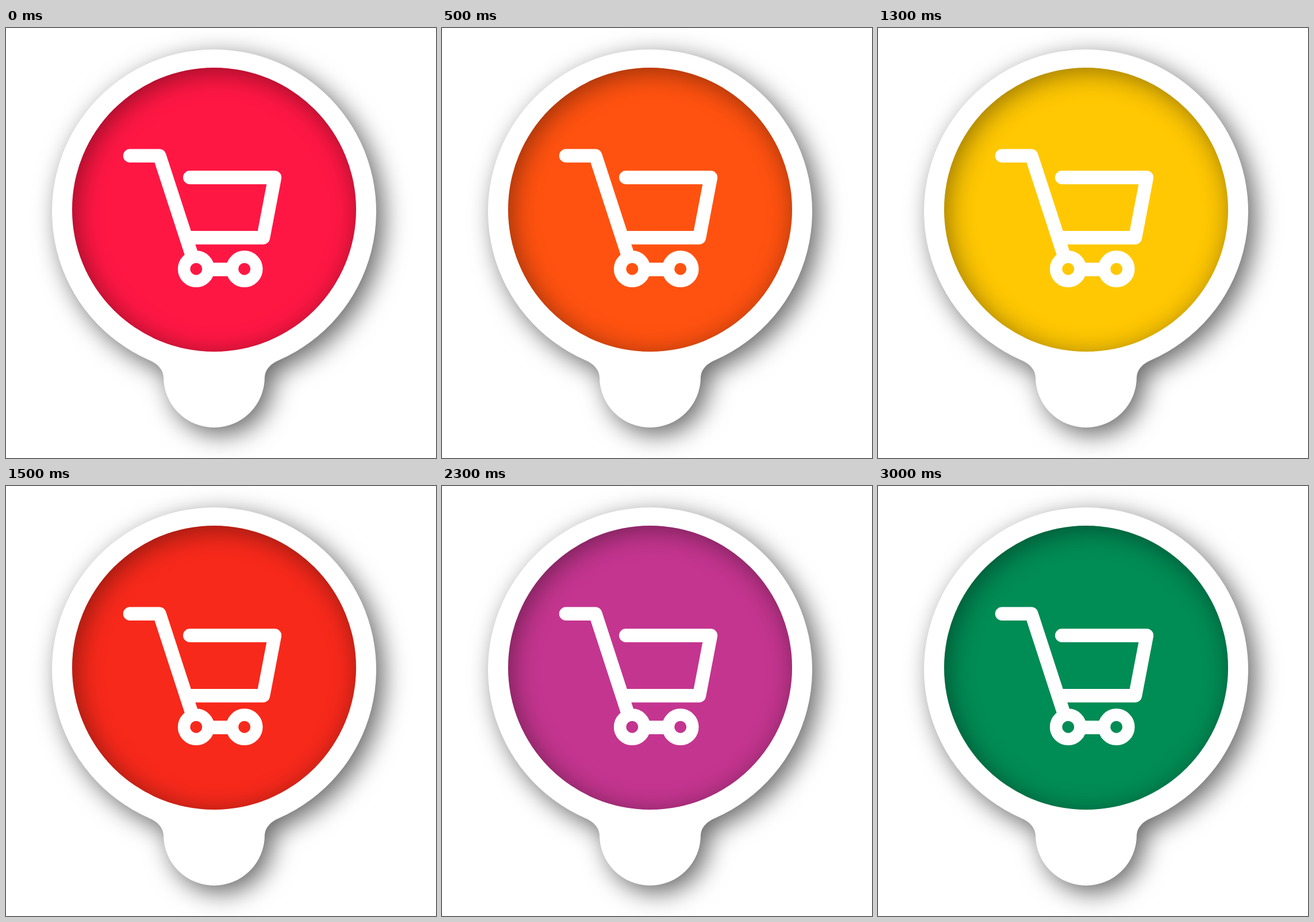
Recreate the animation shown at these times as an HTML page. Size 748 px wide and 748 px high, loop 3500 ms.

```html
<!DOCTYPE html>
<html lang="en">
<head>
<meta charset="utf-8">
<title>Shopping cart pin</title>
<style>
  html, body { margin: 0; width: 100%; height: 100%; overflow: hidden; background: #fff; }
  .stage { position: relative; width: 748px; height: 748px; overflow: hidden; }
  svg { position: absolute; left: 0; top: 0; width: 748px; height: 748px; }
  .pin { fill: #fff; filter: drop-shadow(12px 12px 22px rgba(0, 0, 0, .6)); }
  .disc {
    position: absolute; left: 115px; top: 68.5px; width: 494px; height: 494px;
    border-radius: 50%;
    background: #ff1744;
    box-shadow: inset 6px 7px 46px rgba(0, 0, 0, .42);
  }
  .cart { fill: none; stroke: #fff; stroke-width: 23.4; stroke-linecap: round; stroke-linejoin: round; }
  .wheel { stroke-width: 21.4; }
  .axle { stroke-linecap: butt; }
</style>
</head>
<body>
<div class="stage">
  <svg viewBox="0 0 748 748">
    <path class="pin" d="M249 577.7 A282 282 0 1 1 475 577.7 C460 584 451 594 450 607
      A88 88 0 0 1 274 607 C273 594 264 584 249 577.7 Z"/>
  </svg>
  <div class="disc"></div>
  <svg viewBox="0 0 748 748">
    <g class="cart">
      <path d="M215.5 222.3 H267 L322.5 393"/>
      <path d="M319.7 260 H467.5 L447.5 364.8 H319"/>
      <path class="axle" d="M352 420 H394"/>
      <circle class="wheel" cx="330.8" cy="419.2" r="21.2"/>
      <circle class="wheel" cx="414.7" cy="419.2" r="21.2"/>
    </g>
  </svg>
</div>
<script>
  const STEP = 500;
  const colors = ['#ff1744', '#ff5210', '#ffc803', '#f7291b', '#c4358f', '#0069b4', '#008c55'];
  const frames = [...colors, colors[0]].map((backgroundColor, i) => ({
    backgroundColor, offset: i / colors.length, easing: 'step-end'
  }));
  document.querySelector('.disc').animate(frames, {
    duration: STEP * colors.length, iterations: Infinity
  });
</script>
</body>
</html>
```
